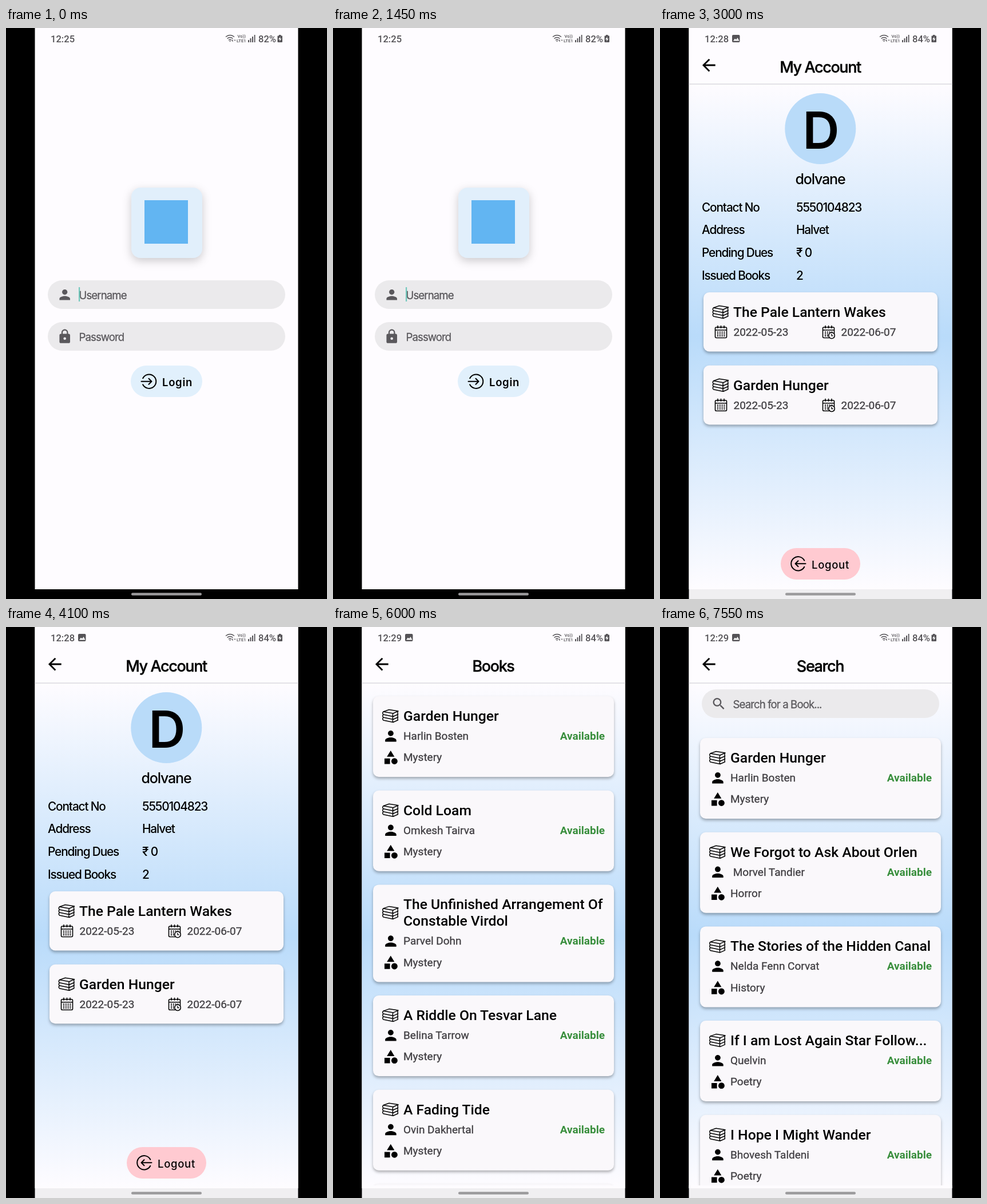
Write an HTML page that moves like this. It is 561 by 998 pixels and loops after 8 s.

```html
<!DOCTYPE html>
<html lang="en">
<head>
<meta charset="utf-8">
<title>Library app tour</title>
<style>
  html, body { margin: 0; width: 100%; height: 100%; overflow: hidden; background: #000; }
  svg { display: block; width: 100%; height: 100%; }
  text { white-space: pre; font-family: Roboto, sans-serif; }
  .mid { text-anchor: middle; }
  .end { text-anchor: end; }

  .clock { font-size: 16.6px; font-weight: 500; fill: #555357; }
  .tiny { font-size: 7.6px; font-weight: 500; fill: #555357; }
  .title, .hint, .button, .tile, .field, .user, .initial { font-family: Inter, sans-serif; font-weight: 500; }
  .title { font-size: 27px; letter-spacing: -1.4px; stroke: #000; stroke-width: .4; }
  .hint { font-size: 18.6px; letter-spacing: -.9px; font-weight: 400; fill: #5a585c; stroke: #5a585c; stroke-width: .3; }
  .button { font-size: 18.5px; letter-spacing: .7px; }
  .strong { font-weight: 600; }
  .tile { font-size: 20px; letter-spacing: 1.2px; }
  .field { font-size: 20.8px; letter-spacing: -1.15px; }
  .user { font-size: 25px; letter-spacing: -1.2px; }
  .initial { font-size: 89px; font-weight: 560; }
  .row { font-size: 21.4px; font-weight: 500; }
  .book { font-size: 24.7px; font-weight: 500; }
  .detail { font-size: 19px; fill: #3f3d41; stroke: #3f3d41; stroke-width: .3; }
  .free { font-size: 19px; font-weight: 700; fill: #388e3c; }

  .card { fill: #faf8fb; filter: drop-shadow(0 3px 2.5px rgb(0 0 0 / .3)); }
  .raised { filter: drop-shadow(0 3px 5px rgb(0 0 0 / .24)); }
  .line { fill: none; stroke: #000; }

  /* Scenes are stacked; each one stays on top from its start to the end of the loop. */
  .scene { animation: 8s step-end infinite; }
  #home { animation-name: from1500; }
  #account { animation-name: from3000; }
  #categories { animation-name: from4500; }
  #books { animation-name: from6000; }
  #search { animation-name: from7500; }
  @keyframes from1500 { 0% { visibility: hidden } 18.75%, 100% { visibility: visible } }
  @keyframes from3000 { 0% { visibility: hidden } 37.5%, 100% { visibility: visible } }
  @keyframes from4500 { 0% { visibility: hidden } 56.25%, 100% { visibility: visible } }
  @keyframes from6000 { 0% { visibility: hidden } 75%, 100% { visibility: visible } }
  @keyframes from7500 { 0% { visibility: hidden } 93.75%, 100% { visibility: visible } }
</style>
</head>
<body>
<svg viewBox="0 0 561 998" preserveAspectRatio="none">
  <defs>
    <linearGradient id="sky" x2="0" y2="1">
      <stop offset="0" stop-color="#fefcff"/><stop offset=".5" stop-color="#b9dbfa"/><stop offset="1" stop-color="#fefcff"/>
    </linearGradient>
    <linearGradient id="panel" x2="0" y2="1">
      <stop offset="0" stop-color="#b9dbf9"/><stop offset="1" stop-color="#e2f0fc"/>
    </linearGradient>
    <clipPath id="list"><path d="M50 99H511V976H50z"/></clipPath>
    <clipPath id="round"><circle cx="470.5" cy="67" r="22.5"/></clipPath>

    <path id="person" d="M12 12c2.21 0 4-1.79 4-4s-1.79-4-4-4-4 1.79-4 4 1.79 4 4 4zm0 2c-2.67 0-8 1.34-8 4v2h16v-2c0-2.66-5.33-4-8-4z"/>
    <path id="lock" d="M18 8h-1V6c0-2.76-2.24-5-5-5S7 3.24 7 6v2H6c-1.1 0-2 .9-2 2v10c0 1.1.9 2 2 2h12c1.1 0 2-.9 2-2V10c0-1.1-.9-2-2-2zm-6 9a2 2 0 1 1 0-4 2 2 0 0 1 0 4zm3.1-9H8.9V6a3.1 3.1 0 0 1 6.2 0z"/>
    <path id="shapes" d="M12 2l-5.5 9h11zM3 13.5h8v8H3zM17.5 13a4.5 4.5 0 1 0 .01 0z"/>
    <path id="lens" d="M15.5 14h-.79l-.28-.27A6.5 6.5 0 1 0 13.73 14.43l.27.28v.79l5 4.99L20.49 19zm-6 0a4.5 4.5 0 1 1 0-9 4.5 4.5 0 0 1 0 9z"/>
    <path id="arrow" d="M20 11H7.83l5.59-5.59L12 4l-8 8 8 8 1.41-1.41L7.83 13H20z"/>
    <g id="stack" class="line" stroke-width="1.5" stroke-linejoin="round">
      <path d="M2 4.5L12 1 28 3.5 19 7.5z"/>
      <path id="layer" d="M2 4.5q-2.500 2.500 0 5L19 13 28 9M19 7.500q-1.500 2.700 0 5.500M27.500 3.500q-1 2.500 0 5.500"/>
      <use href="#layer" y="5"/><use href="#layer" y="10"/>
    </g>
    <g id="calendar" class="line" stroke-width="1.6">
      <rect x="1.5" y="3" width="20" height="18.5" rx="2"/>
      <path d="M1.5 8H21.5M6 0V5M11.5 0V5M17 0V5"/>
      <path d="M5 11.5H18.5M5 14.8H18.5M5 18H18.5" stroke-width="1.9" stroke-dasharray="2 1.8"/>
    </g>
    <g id="due"><use href="#calendar"/>
      <circle cx="17" cy="17.5" r="5.2" fill="#faf8fb" stroke="#000" stroke-width="1.5"/>
      <path class="line" stroke-width="1.3" d="M17 14.5V17.8H19.5"/>
    </g>
    <path id="enter" class="line" stroke-width="2" stroke-linecap="round" stroke-linejoin="round"
      d="M-10.8 -5.5A12.2 12.2 0 1 1 -10.8 5.5M-13.5 0H4.5M-.5 -5L4.5 0 -.5 5"/>
    <path id="leave" class="line" stroke-width="2" stroke-linecap="round" stroke-linejoin="round"
      d="M10.8 -5.5A12.2 12.2 0 1 0 10.8 5.5M13 0H-5M0 -5L-5 0 0 5"/>
    <g id="radio" fill="#555357">
      <g fill="none" stroke="#555357" stroke-width="1.6">
        <path d="M384 15.5q7.5-6 15 0M386.5 18.5q5-4 10 0M389 21.2q2.5-2 5 0"/>
      </g>
      <path d="M390 22.5h3l-1.5 2zM394.5 22l2-2.5v5zM400 20l1.5 2h-3z"/>
      <text class="tiny" x="404.5" y="17">Vo))</text><text class="tiny" x="403" y="25">LTE1</text>
      <path d="M423 21h2v4h-2zM426.5 18h2v7h-2zM430 15h2v10h-2zM433.7 12h1.8v13h-1.8z"/>
      <path d="M474.5 14.5q0-1 1-1h1.5V12h3.5v1.5h1.5q1 0 1 1V24q0 1-1 1h-6.5q-1 0-1-1z"/>
      <path d="M479.5 15l-3.5 5h2.5l-.5 3.5 3.5-5H479z" fill="#fff"/>
    </g>
    <g id="photo"><rect x="126" y="12" width="13.5" height="13" rx="2" fill="#555357"/>
      <path d="M128 22.5l3-4 2 2 2.5-3.5 3 5.5z" fill="#fff"/></g>
  </defs>
</svg>
<script>
const text = (kind, x, y, words) => `<text class="${kind}" x="${x}" y="${y}">${words}</text>`;
const icon = (name, x, y, scale = 1, fill = '#000') =>
  `<use href="#${name}" transform="translate(${x} ${y}) scale(${scale})" fill="${fill}"/>`;
const box = (x, y, w, h, r, attrs) => `<rect x="${x}" y="${y}" width="${w}" height="${h}" rx="${r}" ${attrs}/>`;
const band = (y, h, fill) => box(50.5, y, 460, h, 0, `fill="${fill}"`);
const card = (x, y, w, h) => box(x, y, w, h, 10, 'class="card"');
const input = (y, words, symbol) => box(73, y, 415, 50, 25, 'fill="#ebeaec"') + symbol + text('hint', 127.5, y + 32.5, words);
const paper = '#fefcff';
const sky = band(98, 883, 'url(#sky)');

function scene(id, time, charge, body, nav = '#f0eff1') {
  const photo = id === 'login' ? '' : '<use href="#photo"/>';
  return `<g class="scene" id="${id}">
    <path d="M0 0H561V998H0z"/>${band(0, 981, paper)}${body}
    ${band(981, 17, nav)}${box(219, 987.3, 123, 4.4, 2.2, 'fill="#9b9a9c"')}
    ${text('clock', 78, 24.8, time)}${photo}<use href="#radio"/>${text('clock', 441, 24.8, charge)}</g>`;
}

const bar = band(97.2, 1.6, '#dddce0');
const header = title => `${band(0, 98, paper)}${bar}
  ${icon('arrow', 68.3, 48, 1.42)}${text('title mid', 280, 78, title)}`;

function login() {
  return box(219, 279, 124, 123, 16, 'fill="#e1effb" style="filter:drop-shadow(0 5px 8px rgb(0 0 0 / .2))"')
    + box(242, 301, 76, 76, 0, 'fill="#62b5f2"')
    + input(441, 'Username', icon('person', 88.8, 452.3, 1.16, '#5a585c'))
    + input(514, 'Password', icon('lock', 88.8, 525.3, 1.16, '#5a585c'))
    + box(127, 453, 2.2, 25, 0, 'fill="#72c9bd"')
    + box(218, 590, 125, 55, 27.5, 'fill="#e1f0fc"')
    + icon('enter', 250, 617.7) + text('button strong', 273, 625.8, 'Login');
}

function home() {
  const avatar = `<g clip-path="url(#round)"><circle cx="470.5" cy="67" r="23" fill="#73b6e8"/>
    <path d="M451 92q1-13 13-14h13q12 1 13 14z" fill="#3b80bd"/>
    <path d="M465 71h11v8q-5.5 5-11 0zM461 58q9.5-6 18 0v9q-2 9-9 9t-9-9z" fill="#fbe6df"/>
    <path d="M460 65q-1-14 2-15l5 1q9-2 12 2 2 2 1 12l-2-6q-8 1-12-2-4 1-4 2z" fill="#1e5f9f"/></g>`;
  const tile = (x, r) => box(x, 188, 198, 156, r, 'fill="#e1effb" class="raised"');
  const entry = (y, words) => box(72.5, y, 416, 77, 14, `fill="${paper}" class="raised"`)
    + text('tile mid', 311, y + 47, words);
  const shelf = `<path d="M98 448.5H143V451H98zM102 451h3v4h-3zM135 451h3v4h-3z"/>
    <path d="M102 412h7v3h-7zM102 417h7v2h-7zM102 421h7v26h-7zM111 412h6v35h-6z"/>
    <path d="M104 424h3v18h-3z" fill="#fff"/><path d="M111 417h6M111 440h6" stroke="#fff" stroke-width="1.3"/>
    <path d="M120 414l6-2.5 1 2.5-6 2.5zM122 418.5l6-2.5 11.5 28-6 2.5z"/>
    <path d="M122.5 421.5l6.5-2.7" stroke="#fff" stroke-width="1.3"/>`;
  const coder = `<circle cx="114" cy="520" r="10.5"/><path d="M95 554v-9q0-11 11-11h18q5 0 8 4-14 3-17 16z"/>
    <path class="line" stroke-width="2.6" stroke-linecap="round" stroke-linejoin="round"
      d="M124.5 546l-5.5 5.5 5.5 5.5M139.5 546l5.5 5.5-5.5 5.5M134 543.5l-4.5 15.5"/>`;
  return bar + text('title', 68, 78, 'My Hub') + avatar
    + tile(72, 20) + icon('shapes', 145.1, 221.7, 2.13) + text('tile mid', 172, 304.3, 'Categories')
    + tile(291, 14) + icon('lens', 363.5, 221.5, 2.17) + text('tile mid', 390.5, 304.3, 'Search')
    + '<path d="M51 981V398q0-32 34-32H477q34 0 34 32V981z" fill="url(#panel)"/>'
    + entry(396, 'About Library') + shelf + entry(497, 'Developer') + coder;
}

function account() {
  const fields = [['Contact No', '5550104823'], ['Address', 'Halvet'], ['Pending Dues', '₹ 0'], ['Issued Books', '2']];
  const loan = (y, title) => card(76, y, 409, 103.5)
    + icon('stack', 91.5, y + 22.5) + text('book', 128, y + 43, title)
    + icon('calendar', 95, y + 58) + text('detail', 128.5, y + 76, '2022-05-23')
    + icon('due', 283, y + 58) + text('detail', 316.5, y + 76, '2022-06-07');
  return sky + header('My Account')
    + '<circle cx="280.3" cy="176" r="62" fill="#b9dbf9"/>'
    + text('initial mid', 281.5, 211, 'D') + text('user mid', 280, 273, 'dolvane')
    + fields.map(([label, value], i) =>
        text('field', 73, 320.5 + i * 39.7, label) + text('field', 238, 320.5 + i * 39.7, value)).join('')
    + loan(462, 'The Pale Lantern Wakes') + loan(589.7, 'Garden Hunger')
    + box(211, 909, 139, 55, 27.5, 'fill="#ffcad1"')
    + icon('leave', 241.5, 936.3) + text('button', 265, 944.5, 'Logout');
}

function categories() {
  const names = ['Classics', 'Mystery', 'Fantasy', 'Historical Fiction', 'Horror', 'Literary Fiction', 'Romance',
    'Short Stories', 'Biographies and Autobiographies', 'History'];
  return sky + header('Categories') + names.map((name, i) => {
    const y = 121 + i * 85.75;
    return card(70, y, 421, 62) + text('row', 89, y + 39.5, name);
  }).join('');
}

// A title may be broken over two lines with "|", which makes the card taller.
function bookList(top, books) {
  let y = top;
  const cards = books.map(([title, author, genre]) => {
    const lines = title.split('|');
    const extra = (lines.length - 1) * 29;
    const low = y + extra;
    const out = card(70, y, 421, 141 + extra) + icon('stack', 86, y + 22.5 + extra / 2)
      + lines.map((line, i) => text('book', 123, y + 43 + i * 29, line)).join('')
      + icon('person', 86.3, low + 55, 1.22) + text('detail', 123, low + 76, author)
      + text('free end', 475, low + 76, 'Available')
      + icon('shapes', 86.4, low + 92.6, 1.2) + text('detail', 123, low + 113.3, genre);
    y = low + 164.7;
    return out;
  });
  return `<g clip-path="url(#list)">${cards.join('')}</g>`;
}

const garden = ['Garden Hunger', 'Harlin Bosten', 'Mystery'];
const books = () => sky + header('Books') + bookList(121, [
  garden,
  ['Cold Loam', 'Omkesh Tairva', 'Mystery'],
  ['The Unfinished Arrangement Of|Constable Virdol', 'Parvel Dohn', 'Mystery'],
  ['A Riddle On Tesvar Lane', 'Belina Tarrow', 'Mystery'],
  ['A Fading Tide', 'Ovin Dakhertal', 'Mystery'],
  ['', '', '']]);

const search = () => sky + header('Search')
  + input(109, 'Search for a Book...', icon('lens', 89.1, 120.6, 1.14, '#5a585c'))
  + bookList(194, [
    garden,
    ['We Forgot to Ask About Orlen', ' Morvel Tandier', 'Horror'],
    ['The Stories of the Hidden Canal', 'Nelda Fenn Corvat', 'History'],
    ['If I am Lost Again Star Follow...', 'Quelvin', 'Poetry'],
    ['I Hope I Might Wander', 'Bhovesh Taldeni', 'Poetry']])
  + band(976, 5, paper);

document.querySelector('svg').insertAdjacentHTML('beforeend',
  scene('login', '12:25', '82%', login(), '#000')
  + scene('home', '12:26', '83%', home())
  + scene('account', '12:28', '84%', account())
  + scene('categories', '12:29', '84%', categories())
  + scene('books', '12:29', '84%', books())
  + scene('search', '12:29', '84%', search()));
</script>
</body>
</html>
```
